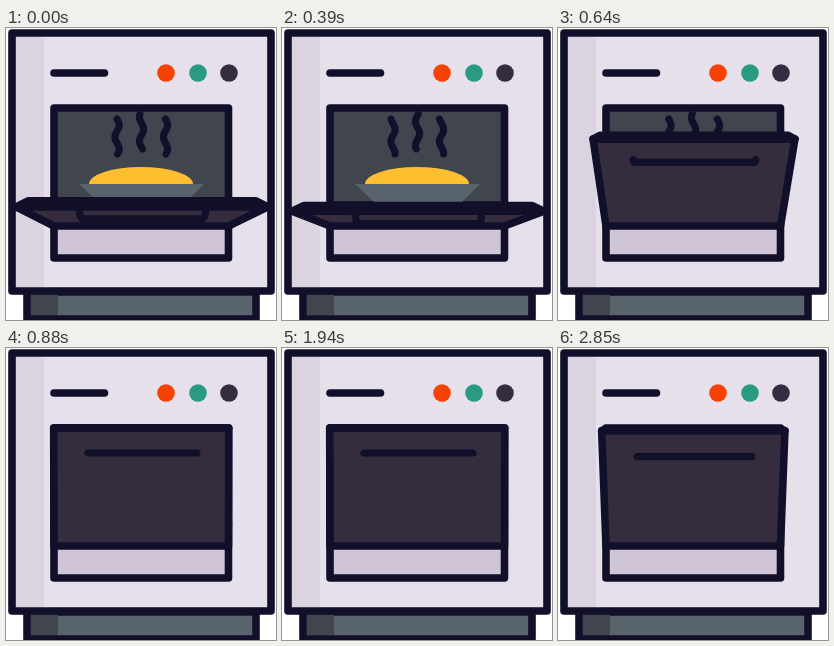
Animation of 270 by 292 pixels, one loop 2880 ms. Source, as an HTML page:

```html
<!DOCTYPE html>
<html lang="en">
<head>
<meta charset="utf-8">
<title>Oven</title>
<style>
  html, body { margin: 0; width: 100%; height: 100%; overflow: hidden; background: #fff; }
  svg { display: block; width: 100%; height: 100%; }
  .ink { stroke: #120f2b; stroke-width: 7.6; stroke-linejoin: round; stroke-linecap: round; }
  .line { fill: none; }
</style>
</head>
<body>
<svg viewBox="0 0 270 292">
  <rect class="ink" x="21" y="264" width="229" height="27" fill="#59636c"/>
  <rect x="25" y="266" width="27" height="21" fill="#41464e"/>
  <rect x="6" y="5" width="259" height="258" fill="#e6e0ea"/>
  <rect x="6" y="5" width="32" height="258" fill="#dbd3e0"/>
  <rect class="ink line" x="6" y="5" width="259" height="258"/>
  <path class="ink line" d="M48 45H98.5"/>
  <circle cx="160" cy="45" r="8.8" fill="#f84204"/>
  <circle cx="192" cy="45" r="8.8" fill="#2a9a82"/>
  <circle cx="223" cy="45" r="8.8" fill="#352d3f"/>

  <rect x="48" y="80" width="174.5" height="118" fill="#41454e"/>
  <rect x="48" y="177" width="174.5" height="21" fill="#30353f"/>
  <path class="ink" d="M48 177H222.5"/>
  <rect x="48" y="198" width="174.5" height="32" fill="#d0c5d6"/>
  <path d="M73 156H198L180 174H92Z" fill="#59636c"/>
  <path d="M83 156A52 17 0 0 1 187 156Z" fill="#fdbf2f"/>
  <g id="steam" class="ink line" style="stroke-width:7"></g>
  <rect class="ink line" x="48" y="80" width="174.5" height="150"/>

  <path id="door" class="ink" fill="#352d3d"/>
  <path id="edge" class="ink" fill="#120f2b"/>
  <path id="handle" class="ink line" style="stroke-width:7.2"/>
</svg>
<script>
const LOOP = 2880, SWING = 1300, OPEN_AT = 205, START = 2790;
const SHUT_Y = 80, OPEN_Y = 207.3, HINGE = 198;
const $ = id => document.getElementById(id);

// lip y, lip half width, rim inset, rim lift, handle drop, handle half width, handle arm
const POSES = [
  [80, 87.5, 0, 0, 25, 54.5, 0],
  [83, 92, 4, 2, 26, 57.5, 0],
  [113, 101.5, 7, 4, 23, 61.5, 3],
  [146, 111.5, 13, 5, 20, 63, 5],
  [178, 126, 12, 6, 12, 63, 8],
  [208, 126, 13, 5, 14, 63, 10]
];

// centre x, top y, wave origin y
const plumes = [[111, 91, 91], [135.5, 86, 95], [159.5, 91, 91]].map(spec => {
  const path = document.createElementNS('http://www.w3.org/2000/svg', 'path');
  $('steam').append(path);
  return { path, spec };
});

function poseAt(y) {
  let i = 1;
  while (i < POSES.length - 1 && y > POSES[i][0]) i++;
  const a = POSES[i - 1], b = POSES[i];
  const k = (y - a[0]) / (b[0] - a[0]);
  return a.map((v, j) => v + (b[j] - v) * k);
}

// The door swings shut, rests, and starts to open just before the loop cuts.
function lipY(t) {
  const half = SWING / 2;
  const d = t < START ? Math.min(Math.abs(t - OPEN_AT), half) : half - (t - START);
  return SHUT_Y + (OPEN_Y - SHUT_Y) * (1 + Math.cos(Math.PI * d / half)) / 2;
}

function wave([cx, top, origin], phase) {
  let d = '';
  for (let y = top; y <= top + 35; y++) {
    const x = cx + 2.1 * Math.cos(2 * Math.PI * (y - origin) / 24 + phase);
    d += (d ? 'L' : 'M') + x.toFixed(2) + ' ' + y;
  }
  return d;
}

function draw(t) {
  const phase = 2 * Math.PI * (t - 270) / 215;
  for (const { path, spec } of plumes) path.setAttribute('d', wave(spec, phase));

  const [y, w, inset, lift, drop, hw, arm] = poseAt(lipY(t));
  const c = 135.2 + 0.8 * Math.min(1, (y - SHUT_Y) / 30);
  const l = c - w, r = c + w, rim = y - lift, bar = y + drop;
  $('door').setAttribute('d', `M${l} ${y}H${r}L222.5 ${HINGE}H48Z`);
  $('edge').setAttribute('d', `M${l} ${y}L${l + inset} ${rim}H${r - inset}L${r} ${y}Z`);
  const hl = 136.5 - hw, hr = 136.5 + hw;
  $('handle').setAttribute('d',
    `M${hl} ${bar - arm}Q${hl} ${bar} ${hl + arm / 2} ${bar}H${hr - arm / 2}Q${hr} ${bar} ${hr} ${bar - arm}`);
}

function tick() {
  draw(performance.now() % LOOP);
  requestAnimationFrame(tick);
}
tick();
</script>
</body>
</html>
```
